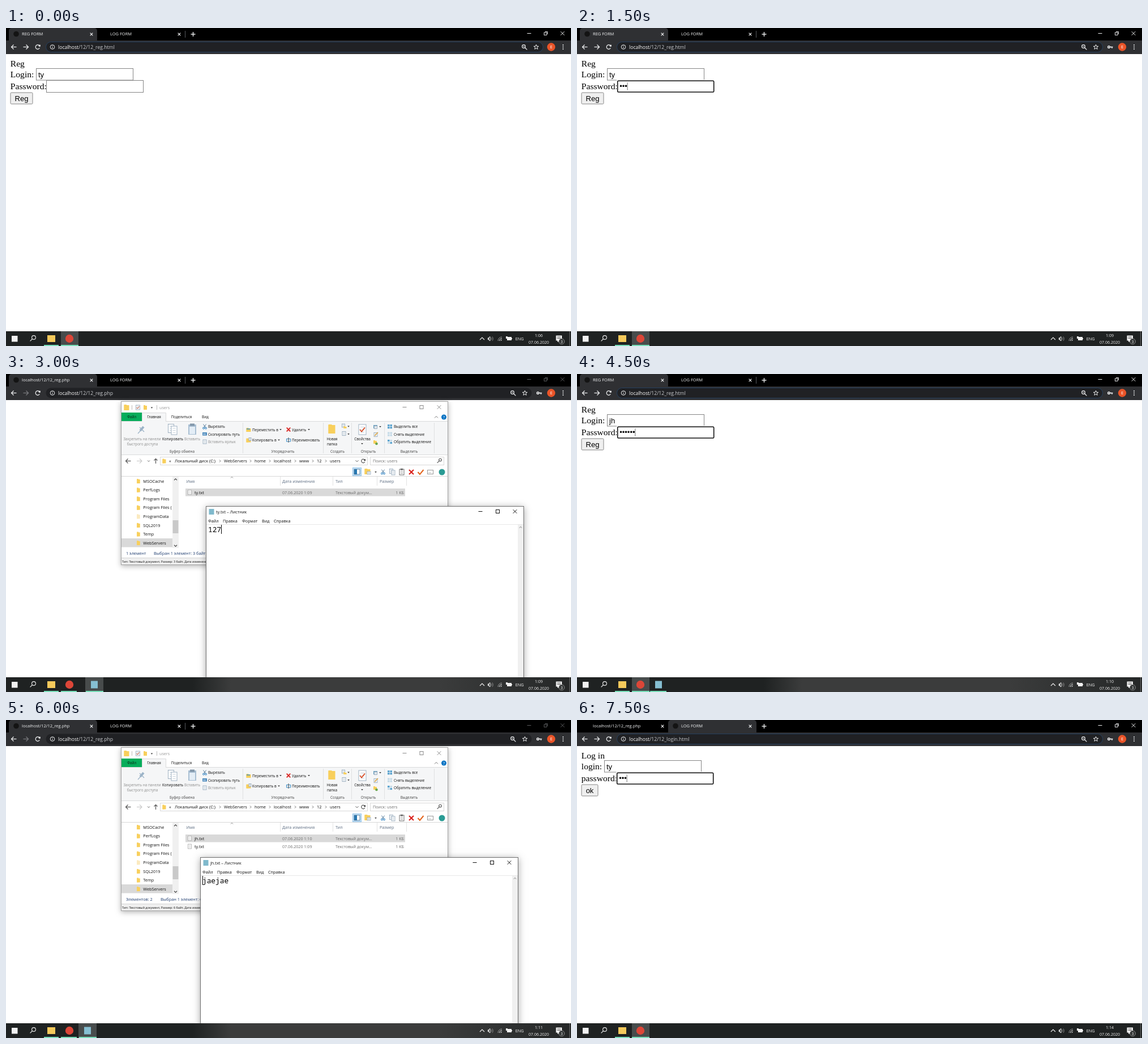
Recreate the animation shown at these times as an HTML page with a canvas. Size 998 by 561 pixels, loop 8000 ms.

```html
<!DOCTYPE html>
<html lang="ru">
<head>
<meta charset="utf-8">
<title>Registration form</title>
<style>
html, body { margin: 0; width: 100%; height: 100%; overflow: hidden; background: #fff; }
canvas { display: block; width: 998px; height: 561px; }
</style>
</head>
<body>
<canvas id="stage" width="998" height="561"></canvas>
<script>
const ctx = document.getElementById('stage').getContext('2d');
const UI = '"Open Sans", "Noto Sans", sans-serif';
const SERIF = '"Liberation Serif", serif';
const SANS = '"Liberation Sans", sans-serif';
const MONO = '"Noto Sans Mono", monospace';
const BAR = '#2f3033', LIGHT = '#f1f2f3', YELLOW = '#f8cf5c', BLUE = '#3d8fc8', RED = '#d8201c';

// --- Helpers
function box(x, y, w, h, fill) {
  ctx.fillStyle = fill;
  ctx.fillRect(x, y, w, h);
}
function frame(x, y, w, h, color, weight = 1) {
  ctx.strokeStyle = color;
  ctx.lineWidth = weight;
  ctx.strokeRect(x, y, w, h);
}
function round(x, y, w, h, r, fill, stroke, weight = 1) {
  ctx.beginPath();
  ctx.roundRect(x, y, w, h, r);
  if (fill) { ctx.fillStyle = fill; ctx.fill(); }
  if (stroke) { ctx.strokeStyle = stroke; ctx.lineWidth = weight; ctx.stroke(); }
}
function dot(x, y, r, fill) {
  ctx.beginPath();
  ctx.arc(x, y, r, 0, Math.PI * 2);
  ctx.fillStyle = fill;
  ctx.fill();
}
function arc(x, y, r, color, weight = 1, from = 0, to = Math.PI * 2) {
  ctx.beginPath();
  ctx.arc(x, y, r, from, to);
  ctx.strokeStyle = color;
  ctx.lineWidth = weight;
  ctx.stroke();
}
function line(color, weight, ...pts) {
  ctx.beginPath();
  for (let i = 0; i < pts.length; i += 2) ctx.lineTo(pts[i], pts[i + 1]);
  ctx.strokeStyle = color;
  ctx.lineWidth = weight;
  ctx.stroke();
}
function text(str, x, y, size, color = '#111', font = UI, align = 'left') {
  ctx.font = `${size}px ${font}`;
  ctx.fillStyle = color;
  ctx.textAlign = align;
  ctx.fillText(str, x, y);
}
function cross(x, y, r, color, weight = 1) {
  line(color, weight, x - r, y - r, x + r, y + r);
  line(color, weight, x + r, y - r, x - r, y + r);
}
function chevron(x, y, dx, dy, color, weight = 1) {
  const px = dy, py = dx;
  line(color, weight, x - dx / 2 - px, y - dy / 2 - py, x + dx / 2, y + dy / 2, x - dx / 2 + px, y - dy / 2 + py);
}
function arrow(x, y, dir, color) {
  line(color, 1.2, x - 4.5, y, x + 4.5, y);
  line(color, 1.2, x + dir * .5, y - 4, x + dir * 4.5, y, x + dir * .5, y + 4);
}
function lens(x, y, r, color, dir = 1) {
  arc(x - dir, y - 1, r, color, 1.1);
  line(color, 1.2, x + dir * (r * .7 - 1), y + r * .7 - 1, x + dir * (r + 2), y + r + 2);
}
function reload(x, y, r, color) {
  arc(x, y, r, color, 1.2, .5, 5.4);
  box(x + r - 2, y - r, 3, 3, color);
}
function folder(x, y, w, h, color = YELLOW) {
  box(x - w / 2, y - h / 2, w * .5, h, color);
  box(x - w / 2, y - h / 2 + 1, w, h - 1, color);
}
function sheet(x, y, w, h, color = '#8aa0b4') {
  box(x - w / 2, y - h / 2, w, h, '#fff');
  frame(x - w / 2, y - h / 2, w, h, color, .8);
  for (let k = 1; k < 4; k++) line(color, .5, x - w / 4, y - h / 2 + h * k / 4, x + w / 4, y - h / 2 + h * k / 4);
}
function drop(x, y) {
  ctx.beginPath();
  ctx.moveTo(x - 1.8, y - 1);
  ctx.lineTo(x + 1.8, y - 1);
  ctx.lineTo(x, y + 1.2);
  ctx.fillStyle = '#333';
  ctx.fill();
}
function scissors(x, y) {
  line('#5b7f9c', 1, x - 2.5, y - 4, x + 1.5, y + 2);
  line('#5b7f9c', 1, x + 2.5, y - 4, x - 1.5, y + 2);
  arc(x - 2, y + 3, 1.5, '#1e78bd');
  arc(x + 2, y + 3, 1.5, '#1e78bd');
}
function check(x, y, r, color, weight) {
  line(color, weight, x - r, y, x - r * .3, y + r * .8, x + r, y - r * .8);
}
function winControls(min, max, close, y, color, restore) {
  line(color, 1, min - 3.5, y, min + 3.5, y);
  if (restore) {
    frame(max - 2.5, y - 1.5, 4.5, 4.5, color, .9);
    line(color, .9, max - 1, y - 3, max + 3.5, y - 3, max + 3.5, y + 1.5);
  } else {
    frame(max - 3, y - 3, 6, 6, color, 1);
  }
  cross(close, y, 3.3, color, 1);
}
function panel(x, y, w, h, border, blur, shade) {
  ctx.save();
  ctx.shadowColor = `rgba(0,0,0,${shade})`;
  ctx.shadowBlur = blur;
  ctx.shadowOffsetY = 2;
  box(x, y, w, h, '#fff');
  ctx.restore();
  frame(x + .5, y + .5, w - 1, h - 1, border);
}

// --- Browser
function browser(s) {
  const idle = !!s.file, first = s.tab === 0;
  box(0, 0, 998, 561, '#fff');
  box(0, 0, 998, 22, '#000');
  box(0, 22, 998, 24, BAR);
  const tabX = first ? 5 : 161;
  round(tabX, 0, 156, 26, [5, 5, 0, 0], BAR);
  dot(tabX + 13, 10.5, 4.8, '#141414');
  text(s.title, 28, 13.3, 7.5, LIGHT);
  text('LOG FORM', 184, 13.3, 7.5, LIGHT);
  cross(151, 11, 2.3, LIGHT, 1.2);
  cross(306, 11, 2.3, LIGHT, 1.2);
  if (first) line('#55575c', 1, 316.5, 5, 316.5, 17);
  line(LIGHT, 1.4, 326.5, 11, 334.5, 11);
  line(LIGHT, 1.4, 330.5, 7, 330.5, 15);
  winControls(924, 953, 983, 9.5, idle ? '#5c5d5f' : LIGHT, true);

  arrow(14, 33.5, -1, LIGHT);
  arrow(35, 33.5, 1, idle ? '#7a7b7f' : LIGHT);
  reload(56, 33.5, 3.8, LIGHT);
  const end = s.key ? 928 : 948;
  round(70.5, 24.5, end - 70, 18, 9, '#202124', idle ? null : '#26405f');
  arc(82, 33.5, 3.8, LIGHT, 1);
  box(81.5, 33, 1, 2.5, LIGHT);
  box(81.5, 31, 1, 1, LIGHT);
  text('localhost', 92, 36.8, 8.65, '#fff');
  const hostWidth = ctx.measureText('localhost').width;
  text('/12/' + s.path, 92 + hostWidth, 36.8, 8.65, '#c9cbce');
  lens(end - 32.5, 33.5, 2.9, LIGHT);
  line(LIGHT, .8, end - 35, 32.5, end - 32, 32.5);
  star(end - 11.5, 33.7);
  if (s.key) {
    arc(939.5, 33.5, 1.8, LIGHT, 1.5);
    line(LIGHT, 1.5, 941.5, 33.5, 946.5, 33.5);
    line(LIGHT, 1.3, 945, 33.5, 945, 36);
  }
  dot(963, 33.5, 7.2, '#ea5428');
  text('E', 963, 36.3, 7.5, '#fff', UI, 'center');
  for (const y of [30, 33.5, 37]) dot(984, y, 1, LIGHT);
}
function star(x, y) {
  ctx.beginPath();
  for (let k = 0; k < 10; k++) {
    const a = k * Math.PI / 5 - Math.PI / 2, r = k % 2 ? 1.9 : 4.5;
    ctx.lineTo(x + r * Math.cos(a), y + r * Math.sin(a));
  }
  ctx.closePath();
  ctx.strokeStyle = LIGHT;
  ctx.lineWidth = 1;
  ctx.stroke();
}

// --- Web form
function form(s) {
  const f = s.form, size = 15.6;
  text(f.head, 7.8, 68, size, '#000', SERIF);
  text(f.login, 7.8, 87, size, '#000', SERIF);
  text(f.pass, 7.8, 107.5, size, '#000', SERIF);
  frame(f.x1 + .5, 71.5, 171, 20.5, '#858585');
  text(s.user, f.x1 + 4, 87, 13, '#000', SANS);
  if (s.dots) {
    box(f.x2 - 1, 91.3, 173, 22.7, '#fff');
    round(f.x2 + .7, 93.2, 170, 19.8, 1.5, '#fff', '#101010', 1.6);
    text('•'.repeat(s.dots), f.x2 + 4.2, 107.3, 13, '#000', SANS);
    line('#555', .8, f.x2 + 4.5 + s.dots * 4.55, 96, f.x2 + 4.5 + s.dots * 4.55, 110);
  } else {
    frame(f.x2 + .5, 92.5, 171, 21, '#858585');
  }
  round(8, 114, f.bw, 20, 1.5, '#efefef', '#858585');
  text(f.button, 8 + f.bw / 2, 128.5, 13, '#000', SANS, 'center');
}

// --- File manager
function explorer(s) {
  panel(203, 48, 578, 289, '#a3a3a3', 9, .3);
  folder(213, 59, 9, 10);
  line('#aaa', .8, 222.5, 55, 222.5, 63);
  sheet(233, 59, 7, 8);
  check(233, 59, 2.5, '#d0522b', 1);
  folder(246, 59, 6, 8);
  drop(257.5, 59.5);
  line('#aaa', .8, 266.5, 55, 266.5, 63);
  text('users', 271, 61.5, 7.2, '#999');
  winControls(704, 734, 765, 58.5, '#8a8a8a');
  ribbon();
  address();
  tools();
  tree();
  list(s);
  const count = s.second ? 'Элементов: 2' : '1 элемент';
  text(count, 212, 319.3, 7.3, '#1f3d70');
  text(`Выбран 1 элемент: ${s.bytes} байт`, s.second ? 273 : 261, 319.3, 7.3, '#1f3d70');
  box(204, 324, 576, 12, '#f0f0f0');
  line('#d5d5d5', 1, 204, 324.5, 780, 324.5);
  text(`Тип: Текстовый документ, Размер: ${s.bytes} байт, Дата изменения: 07.06.2020`, 205, 333, 5.45);
}
function ribbon() {
  const size = 6.35, gray = '#8d8d8d';
  const label = (str, x, y, color) => text(str, x, y, size, color);
  const mid = (str, x, y, color) => text(str, x, y, size, color, UI, 'center');
  box(204, 83, 576, 60, '#f5f6f7');
  line('#dadbdc', 1, 204, 83.5, 780, 83.5);
  line('#dadbdc', 1, 204, 142.5, 780, 142.5);
  box(204, 68, 36, 15, '#06ad5b');
  box(240, 68, 42, 16, '#f5f6f7');
  line('#dadbdc', 1, 240.5, 83, 240.5, 68.5, 282.5, 68.5, 282.5, 83);
  mid('Файл', 222, 78.3, '#0c2818');
  mid('Главная', 261.5, 78.3);
  mid('Поделиться', 310, 78.3);
  mid('Вид', 352, 78.3);
  chevron(760, 76, 0, -3, '#777');
  dot(773.5, 76, 4.5, '#0a74c4');
  text('?', 773.5, 78.7, 7, '#fff', UI, 'center');

  line('#9db4c8', 4, 237, 100, 243, 93);
  line('#9db4c8', 1.2, 233, 105, 242, 95);
  line('#9db4c8', 1.5, 236, 94, 244, 102);
  mid('Закрепить на панели', 240.5, 116.7, gray);
  mid('быстрого доступа', 241, 125.5, gray);
  sheet(291.5, 96, 10, 15);
  sheet(297, 99.5, 10, 15);
  mid('Копировать', 294.5, 116.7);
  box(322, 89, 14, 18, '#a9bfd3');
  box(325, 87.5, 8, 4, '#8297aa');
  box(324, 93, 10, 13, '#e3edf6');
  mid('Вставить', 329, 116.7, gray);
  scissors(351, 92.5);
  label('Вырезать', 357, 95.3);
  box(347, 103, 8, 5.5, '#4b8abd');
  line('#fff', 1, 348, 106, 353, 106);
  label('Скопировать путь', 357, 108.5);
  sheet(351, 119.5, 6, 7);
  label('Вставить ярлык', 357, 122, gray);

  folder(428.5, 98.5, 8, 7);
  line(BLUE, 1.5, 425, 97, 431, 97);
  label('Переместить в', 435, 100.5);
  drop(485, 98);
  folder(428.5, 117, 8, 7);
  sheet(431, 115, 4, 5);
  label('Копировать в', 435, 119);
  drop(482, 116.5);
  cross(499, 98, 3.3, RED, 1.8);
  label('Удалить', 505, 100.5);
  drop(535, 98);
  frame(495.5, 114.5, 7, 4.5, BLUE);
  line('#444', 1, 499, 112, 499, 121);
  label('Переименовать', 505, 119);

  folder(575.5, 97, 12, 16);
  mid('Новая', 576, 116.7);
  mid('папка', 576, 125.5);
  sheet(596, 91, 5, 6);
  folder(599, 94, 5, 4);
  sheet(597, 105, 6, 7);
  drop(605, 92.5);
  drop(605, 106);
  sheet(629.5, 98, 13, 18);
  check(629.5, 98, 4.5, '#d9512c', 1.8);
  mid('Свойства', 629.5, 116.7);
  drop(629, 123);
  box(649, 90, 7, 6, '#6fa5c5');
  sheet(653, 94, 5, 5);
  drop(661, 93);
  sheet(653, 107, 6, 7);
  line('#e4a63a', 1.5, 651, 109, 657, 103);
  folder(652, 120, 6, 6);
  dot(654.5, 123, 2.3, '#68a54c');
  ['Выделить все', 'Снять выделение', 'Обратить выделение'].forEach((str, k) => {
    const y = 92.7 + k * 13.4;
    for (const dx of [-2.2, 2.2]) for (const dy of [-2, 2])
      box(678 + dx - 1.8, y + dy - 1.6, 3.6, 3.2, k === 0 || k === 2 && dx * dy > 0 ? '#5aa3cf' : '#c6dbe8');
    label(str, 685, y + 2.5);
  });
  const groups = { 'Буфер обмена': 311, 'Упорядочить': 489, 'Создать': 585.5, 'Открыть': 640, 'Выделить': 712 };
  for (const g in groups) mid(g, groups[g], 138.5, '#444');
  for (const x of [418.5, 560.5, 610.5, 668.5, 756.5]) line('#dfe0e1', 1, x, 86, x, 140);
}
function address() {
  arrow(216, 153.5, -1, '#555');
  arrow(235.5, 153.5, 1, '#ccc');
  chevron(252, 153.5, 0, 2, '#666');
  line('#555', 1.2, 264.5, 158, 264.5, 149.5);
  chevron(264.5, 151, 0, -3, '#555', 1.2);
  frame(272.5, 146.5, 366, 14, '#d9d9d9');
  folder(279.5, 153.5, 6, 8);
  const crumbs = [['«', 288], ['Локальный диск (C:)', 298], ['WebServers', 385], ['home', 439], ['localhost', 473],
    ['www', 518], ['12', 549], ['users', 572]];
  for (const [str, x] of crumbs) text(str, x, 156, 7.35);
  for (const x of [378, 432, 466, 511, 542, 565]) chevron(x, 153.5, 2, 0, '#555', .9);
  chevron(620, 153.5, 0, 2.5, '#555');
  reload(631, 153.5, 3.2, '#555');
  frame(643.5, 146.5, 130, 14, '#d9d9d9');
  text('Поиск: users', 648, 156, 7.2, '#6d6d6d');
  lens(766, 152.5, 2.3, '#555', -1);
}
function tools() {
  box(612, 165, 16, 15, '#cce4f7');
  frame(612.5, 165.5, 15, 14, '#8fc3ea');
  box(615, 168, 10, 9, '#fff');
  box(615, 168, 5, 9, '#2678b2');
  frame(615, 168, 10, 9, '#376a91', .8);
  folder(638.5, 172, 10, 10);
  sheet(641, 174.5, 6, 5);
  drop(653, 173);
  scissors(666, 172.5);
  sheet(680.5, 171.5, 6, 8);
  sheet(684, 174, 6, 8);
  sheet(699, 173, 8, 10, '#4a4a4a');
  box(697, 167, 4, 2, '#4a4a4a');
  cross(716, 173, 4, RED, 2.2);
  check(732.5, 173, 5, '#e3641d', 2);
  frame(744.5, 169.5, 10, 7, '#999');
  line('#bbb', 1, 746, 174, 751, 174);
  dot(770, 173, 5.5, '#2a9b94');
  line('#d8d8d8', 1, 204, 180.5, 780, 180.5);
}
function tree() {
  const names = ['MSOCache', 'PerfLogs', 'Program Files', 'Program Files (', 'ProgramData', 'SQL2019', 'Temp', 'WebServers'];
  box(204, 290, 90, 15.5, '#d9d9d9');
  names.forEach((name, k) => {
    const y = 189 + k * 15.57;
    folder(234, y, 5.5, 8, name === 'ProgramData' ? '#fbeabf' : YELLOW);
    text(name, 242.3, y + 2.7, 7.3);
  });
  box(294, 181, 11, 126, '#f0f0f0');
  box(294.5, 258, 10, 23, '#c9c9c9');
  chevron(299.5, 186, 0, -2.5, '#444', 1.1);
  chevron(299.5, 303, 0, 2.5, '#444', 1.1);
}
function list(s) {
  const heads = { 'Имя': 318.5, 'Дата изменения': 488, 'Тип': 582, 'Размер': 660 };
  for (const h in heads) text(h, heads[h], 192, 7.2, '#5b6b80');
  for (const x of [484.5, 577.5, 655.5, 707.5]) line('#e3e3e3', 1, x, 181, x, 197);
  chevron(399, 182.5, 0, -2, '#777', .9);
  const row = (name, time, y) => {
    sheet(324.5, y - 3, 6, 8, '#a9a9a9');
    text(name, 333, y, 7.3);
    text('07.06.2020 ' + time, 488, y, 7.15, '#6d6d6d');
    text('Текстовый докум...', 582, y, 7.15, '#6d6d6d');
    text('1 КБ', 703, y, 7.2, '#6d6d6d', UI, 'right');
  };
  box(317, 202, 388, 13.5, '#d9d9d9');
  row(s.file, s.saved, 211.7);
  if (s.second) row('ty.txt', '1:09', 226);
}

// --- Text editor
function editor(s) {
  ctx.save();
  ctx.translate(s.dx, s.dy);
  panel(353, 233, 562, 320, '#6f6f6f', 12, .35);
  box(358.5, 238, 9, 10, '#7fb9cc');
  text(s.file + ' – Листник', 371, 245.5, 7.35);
  winControls(838, 868.5, 899, 242.5, '#111');
  const menu = { 'Файл': 357, 'Правка': 383, 'Формат': 417, 'Вид': 452, 'Справка': 473 };
  for (const m in menu) text(m, menu[m], 261.7, 7.25);
  line('#e8e8e8', 1, 354, 265.5, 914, 265.5);
  box(904, 266, 10, 290, '#f0f0f0');
  chevron(909, 270.5, 0, -2.3, '#aaa', 1.1);
  text(s.body, 357, 278.5, 12.8, '#000', MONO);
  const caretX = s.caret ? 357 + ctx.measureText(s.body).width : 357;
  line('#000', 1, caretX + .5, 266, caretX + .5, 282);
  ctx.restore();
}

// --- Taskbar
function taskbar(s) {
  box(0, 535, 998, 26, '#1f2222');
  if (s.glow) {
    const g = ctx.createLinearGradient(330, 0, 998, 0);
    g.addColorStop(0, '#1f2222');
    g.addColorStop(.1, '#3b3c3c');
    g.addColorStop(.65, '#3b3c3c');
    g.addColorStop(.85, '#2e3030');
    g.addColorStop(1, '#252727');
    box(330, 535, 668, 26, g);
  }
  const W = '#f2f2f2', under = '#78dfb9';
  box(10, 543, 10.5, 10.5, W);
  lens(48, 547, 3.4, W, -1);
  box(67, 559, 26, 2, under);
  box(73, 542, 14, 12, '#f4c95b');
  if (!s.file) box(97, 535, 31, 26, '#484c4c');
  box(97, 559, s.file ? 28 : 31, 2, under);
  dot(112, 548, 7.2, '#dc4638');
  if (s.app) {
    if (s.file) box(s.app - 16, 535, 32, 26, '#484c4c');
    box(s.app - 15, 559, s.file ? 31 : 29, 2, under);
    box(s.app - 6, 541.5, 12, 13, '#86bfd2');
  }
  chevron(841, 548, 0, -4, W, 1.1);
  box(851, 546.5, 2, 3.5, W);
  line(W, 1, 852, 547, 855, 544.5, 855, 552, 852, 549.5);
  arc(855, 548.2, 3, '#aaa', .8, -.8, .8);
  arc(855, 548.2, 5.3, '#999', .8, -.8, .8);
  for (const r of [2, 4.5, 7]) arc(876, 552, r, r > 5 ? '#999' : W, 1, Math.PI, Math.PI * 1.5);
  box(885, 545, 8, 6, W);
  box(893, 547, 1, 2, W);
  box(883, 544, 3, 4, W);
  text('ENG', 899.7, 550.8, 7.35, W);
  text(s.clock, 941, 545, 7.1, W, UI, 'center');
  text('07.06.2020', 941, 557, 7.1, W, UI, 'center');
  box(971.5, 542.5, 10.5, 9, W);
  box(974, 551, 3, 2.5, W);
  for (const y of [545, 547.5]) line('#333', .8, 973.5, y, 980, y);
  dot(981.5, 553, 5, '#303333');
  arc(981.5, 553, 5, '#aaa', .7);
  text('3', 981.5, 555.6, 7, W, UI, 'center');
  line('#666', 1, 995.5, 535, 995.5, 561);
}

// --- Timeline
const reg = { head: 'Reg', login: 'Login:', pass: 'Password:', button: 'Reg', x1: 53, x2: 71, bw: 39 };
const log = { head: 'Log in', login: 'login:', pass: 'password:', button: 'ok', x1: 48, x2: 70, bw: 29 };
const regPage = { tab: 0, title: 'REG FORM', path: '12_reg.html', form: reg };
const saved = { tab: 0, title: 'localhost/12/12_reg.php', path: '12_reg.php', key: true };
const scenes = [
  { ...regPage, user: 'ty', clock: '1:06' },
  { ...regPage, user: 'ty', dots: 3, key: true, clock: '1:09' },
  { ...saved, file: 'ty.txt', saved: '1:09', bytes: 3, body: '127', caret: true, dx: 0, dy: 0, app: 156, glow: true, clock: '1:09' },
  { ...regPage, user: 'jh', dots: 6, key: true, app: 144, glow: true, clock: '1:10' },
  { ...saved, file: 'jh.txt', saved: '1:10', bytes: 6, second: true, body: 'jaejae', dx: -10, dy: 9, app: 144, glow: true, clock: '1:11' },
  { ...saved, tab: 1, path: '12_login.html', form: log, user: 'ty', dots: 3, clock: '1:14' }
];

function draw() {
  const s = scenes[Math.floor(performance.now() % 8000 / 1500)];
  browser(s);
  if (s.file) {
    explorer(s);
    editor(s);
  } else {
    form(s);
  }
  taskbar(s);
  requestAnimationFrame(draw);
}
draw();
</script>
</body>
</html>
```
